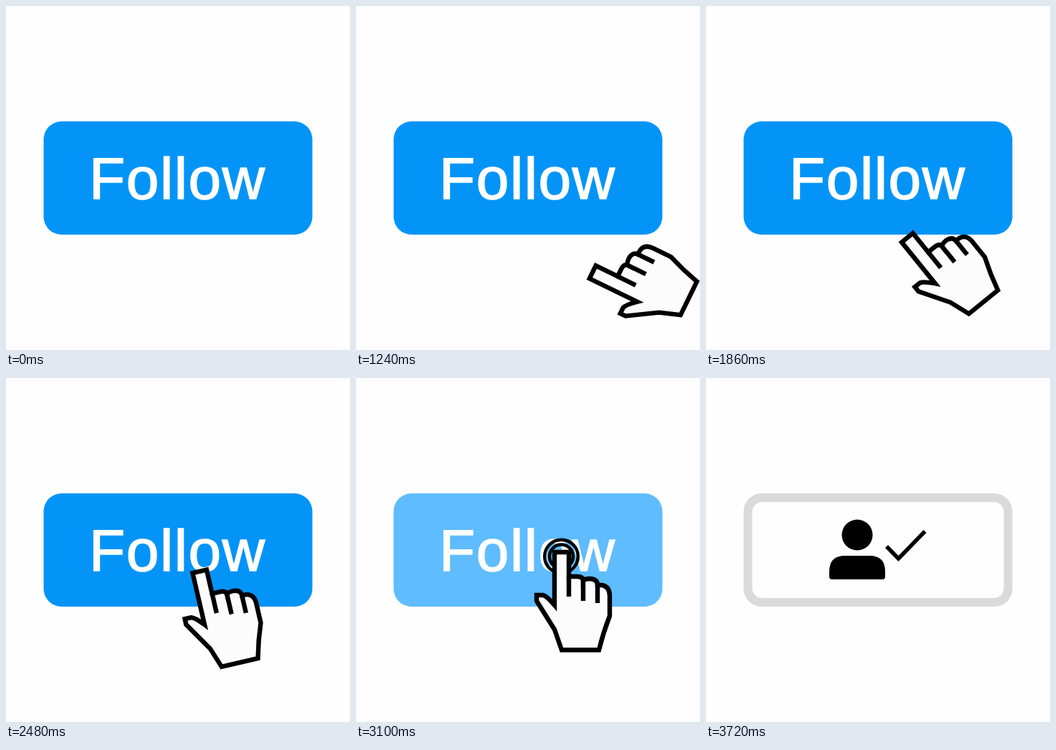
Write an HTML page that moves like this. It is 480x480 px and loops after 4030 ms.

```html
<!DOCTYPE html>
<html lang="en">
<head>
<meta charset="utf-8">
<title>Follow button</title>
<style>
  html, body { margin: 0; width: 100%; height: 100%; overflow: hidden; background: #fefefe; }
  svg { display: block; width: 100vw; height: 100vh; }
  text { font: 82px "Liberation Sans", Arial, sans-serif; letter-spacing: 1.6px; fill: #fff; stroke: #fff; stroke-width: 1.6; }
  .line { fill: none; stroke: #000; }
</style>
</head>
<body>
<svg viewBox="0 0 480 480">
  <g id="follow">
    <rect id="button" x="52.5" y="161" width="375" height="158" rx="25"/>
    <text x="116.1" y="268.9">Follow</text>
  </g>
  <g id="done">
    <rect x="52.5" y="161" width="375" height="158" rx="25" fill="#dadada"/>
    <rect x="64.5" y="173" width="351" height="134" rx="14" fill="#fefefe"/>
    <circle cx="211" cy="219" r="21.5"/>
    <path d="M172 277V270Q172 248 194 248H228Q250 248 250 270V277Q250 281 246 281H176Q172 281 172 277Z"/>
    <path class="line" stroke-width="5.5" d="M252 235L268.5 252L305.5 214"/>
  </g>
  <g class="line" stroke-width="4.5">
    <circle id="outer" cx="286.5" cy="249" r="23.3"/>
    <circle id="inner" cx="286.5" cy="249" r="16.5"/>
  </g>
  <!-- fingertip at the origin, finger pointing up -->
  <g id="hand" stroke="#000" stroke-width="6.4" fill="#fcfcfc">
    <path d="M-10 77V3H10V37H21Q30 37 30 43Q32 40 40 40Q50 41 50 49H56Q67 51 67 64V92Q58 115 52 139.5H0L-10 111L-35 71V63H-26Q-21 64 -10 77Z"/>
    <path class="line" d="M10 36V65M30 42V71M50 48V74"/>
  </g>
</svg>
<script>
  const STEP = 310;
  const BLUE = "#0494f7", MID = "#31a8fb", LIGHT = "#5ebcff";

  // tip x, tip y and turn of the hand at each step; null hides it
  const poses = [
    null,
    [437, 410, -95],
    [397, 399.5, -85],
    [361, 386, -75],
    [327.5, 370, -64],
    [301.5, 344, -52],
    [279, 321, -39],
    [271, 293, -26],
    [269.5, 267, -13],
    [287, 240, 0],
    [287, 240, 0],
    [287, 240, 0],
    null
  ];
  const PRESS = 9, HELD = 10, DONE = 11;

  const el = id => document.getElementById(id);
  const show = (id, on) => el(id).setAttribute("visibility", on ? "visible" : "hidden");

  function draw(step) {
    const pose = poses[step];
    show("hand", pose);
    if (pose) {
      const [x, y, turn] = pose;
      el("hand").setAttribute("transform", `translate(${x} ${y}) rotate(${turn})`);
    }
    show("follow", step < DONE);
    show("done", step >= DONE);
    show("inner", step === PRESS || step === HELD);
    show("outer", step === HELD);
    el("button").setAttribute("fill", step < PRESS ? BLUE : step === PRESS ? MID : LIGHT);
  }

  const start = performance.now();
  function tick() {
    const time = performance.now() - start;
    draw(Math.floor(time / STEP) % poses.length);
    requestAnimationFrame(tick);
  }
  tick();
</script>
</body>
</html>
```
